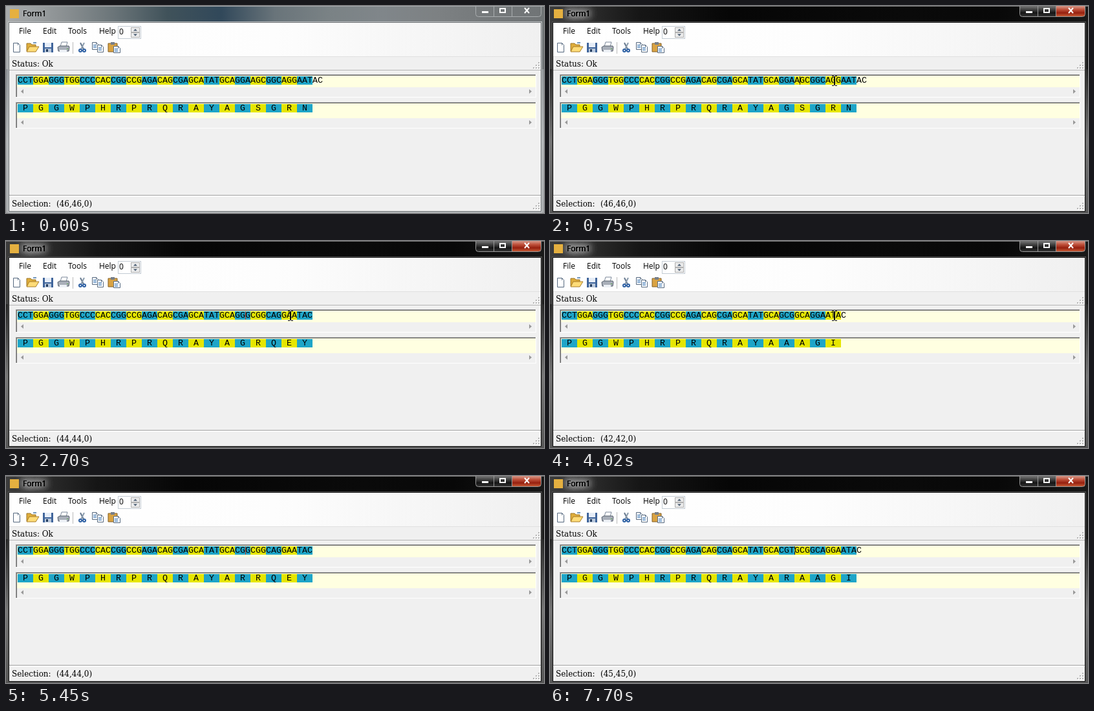
Animation, 832 px wide and 321 px high, one loop 8000 ms. Source, as an HTML page with a canvas:

```html
<!DOCTYPE html>
<html>
<head>
<meta charset="utf-8">
<style>
html, body { margin: 0; width: 100%; height: 100%; overflow: hidden; background: #000 }
canvas { display: block }
</style>
</head>
<body>
<canvas id="stage" width="832" height="321"></canvas>
<script>
const ctx = document.getElementById('stage').getContext('2d');
const LOOP = 8000, CELL = 8, LEFT = 18;
const UI = '12px "Open Sans", sans-serif';
const SERIF = '12px "DejaVu Serif", serif';
const MONO = '13.3px "Liberation Mono", monospace';
const BLUE = '#1ea5c8', YELLOW = '#e6e600', PAPER = '#ffffe1', FACE = '#f0f0f0';

// Editing: each key removes the base before the caret or inserts one there.
const START = 'CCTGGAGGGTGGCCCCACCGGCCGAGACAGCGAGCATATGCAGGAAGCGGCAGGAATAC';
const KEYS = [[2220, ''], [2700, ''], [3030, ''], [3490, ''], [4520, 'C'], [5450, 'G'], [6140, 'T']];
const BLINKS = [1310, 1840, 4020, 5070, 5910, 6620, 7150, 7700];
const ACTIVATED = 750, MOUSE_HIDDEN = 4520;
const AMINO = 'FFLLSSSSYY**CC*WLLLLPPPPHHQQRRRRIIIMTTTTNNKKSSRRVVVVAAAADDEEGGGG';
const translate = codon => AMINO[[...codon].reduce((n, base) => n * 4 + 'TCAG'.indexOf(base), 0)];

function editorAt(t) {
  let text = START, caret = 46, since = ACTIVATED;
  for (const [time, base] of KEYS) {
    if (t < time) break;
    text = text.slice(0, base ? caret : caret - 1) + base + text.slice(caret);
    caret += base ? 1 : -1;
    since = time;
  }
  const blinks = BLINKS.filter(b => b > since && b <= t).length;
  return { text, caret, lit: blinks % 2 === 0 };
}

function rect(x, y, w, h, color) {
  ctx.fillStyle = color;
  ctx.fillRect(x, y, w, h);
}
function frame(x, y, w, h, color) {
  ctx.strokeStyle = color;
  ctx.lineWidth = 1;
  ctx.strokeRect(x + .5, y + .5, w - 1, h - 1);
}
function label(str, x, y, font, color = '#000') {
  ctx.font = font;
  ctx.fillStyle = color;
  ctx.fillText(str, x, y);
}
function poly(points, fill, stroke, width = 1) {
  ctx.beginPath();
  points.forEach(([x, y]) => ctx.lineTo(x, y));
  ctx.closePath();
  if (fill) { ctx.fillStyle = fill; ctx.fill(); }
  if (stroke) { ctx.strokeStyle = stroke; ctx.lineWidth = width; ctx.stroke(); }
}
function line(x1, y1, x2, y2, color, width = 1) {
  poly([[x1, y1], [x2, y2]], null, color, width);
}
function gradient(x1, y1, x2, y2, ...colors) {
  const g = ctx.createLinearGradient(x1, y1, x2, y2);
  colors.forEach((c, i) => g.addColorStop(i / (colors.length - 1), c));
  return g;
}

function drawGlass(active) {
  rect(0, 0, 832, 321, active
    ? gradient(0, 0, 832, 0, '#3c3c3c', '#161616', '#060606', '#080808', '#0a0a0a', '#080808', '#181818')
    : gradient(0, 0, 832, 0, '#a8abad', '#8d9294', '#6b7579', '#40525a', '#31485a', '#69747a',
      '#7a8285', '#80868a', '#7d8183', '#74787a', '#707476'));
  rect(0, 0, 832, 1, active ? '#777' : '#a5a9ac');
  const side = active
    ? gradient(0, 98, 0, 321, '#222', '#777', '#555')
    : gradient(0, 98, 0, 321, '#8d9194', '#b0b3b5', '#a5a8aa');
  rect(0, 98, 832, 223, side);

  ctx.save();
  ctx.shadowColor = active ? '#fff' : '#ccc';
  ctx.shadowBlur = 12;
  for (let i = 0; i < (active ? 4 : 1); i++) label('Form1', 26, 16, UI);
  ctx.restore();
  label('Form1', 26, 16, UI);
  rect(6, 5, 14, 14, '#e5b040');
  drawCaptionButtons(active);
}

function drawCaptionButtons(active) {
  if (active) {
    rect(727, 0, 60, 16, gradient(0, 0, 0, 16, '#777', '#444', '#151515', '#333'));
    rect(783, 0, 44, 16, gradient(0, 0, 0, 16, '#d79a8c', '#c0523c', '#96200f', '#c65a35'));
  }
  const edge = active ? '#999' : '#a9adaf';
  ctx.beginPath();
  ctx.roundRect(726.5, -4.5, 101, 21, 4);
  ctx.strokeStyle = edge;
  ctx.lineWidth = 1;
  ctx.stroke();
  rect(754, 0, 1, 16, edge);
  rect(782, 0, 1, 16, edge);
  rect(736, 8, 10, 3, '#fff');
  ctx.strokeStyle = '#fff';
  ctx.lineWidth = 2;
  ctx.strokeRect(764, 4, 8, 6);
  line(802, 3, 809, 11, '#fff', 2);
  line(809, 3, 802, 11, '#fff', 2);
}

function page(x, y, w = 10, h = 13) {
  poly([[x, y], [x + w - 3, y], [x + w, y + 3], [x + w, y + h], [x, y + h]], '#fff', '#56697f');
  line(x + w - 3, y, x + w - 3, y + 3, '#56697f');
}
function textLines(x, y) {
  for (let i = 0; i < 3; i++) rect(x, y + i * 2, 5, 1, '#4b83bd');
}

function drawToolbar() {
  page(11.5, 57.5, 10, 14);

  poly([[32, 70], [32, 58], [38, 58], [40, 60], [46, 60], [46, 70]], '#dfad3b', '#9a7426');
  poly([[32, 71], [36, 63], [51, 63], [46, 71]], '#ffdc78', '#a87d28');
  line(42, 57, 47, 57, '#4676aa');

  rect(57, 57, 16, 15, '#40659b');
  rect(60, 57, 10, 7, '#e6edf7');
  rect(60, 66, 10, 6, '#bac9dc');
  rect(62, 67, 3, 4, '#263e60');

  poly([[84, 63], [86, 56], [95, 56], [93, 63]], '#fff', '#7a8799');
  poly([[80, 64], [83, 62], [97, 62], [98, 64], [97, 70], [81, 70]], '#a9afb9', '#535c69');
  rect(83, 68, 11, 4, '#edf1f6');
  rect(94, 66, 2, 1, '#4fa43f');
  rect(103, 56, 1, 18, '#bbb');

  line(115, 57, 120, 67, '#65788d', 2);
  line(121, 57, 116, 67, '#8b9cad', 2);
  ctx.strokeStyle = '#2c5fa3';
  ctx.lineWidth = 2;
  for (const x of [115, 121]) {
    ctx.beginPath();
    ctx.arc(x, 69, 2, 0, 7);
    ctx.stroke();
  }

  page(133.5, 56.5, 9, 11);
  textLines(135, 60);
  page(141.5, 60.5, 9, 11);
  textLines(143, 64);

  poly([[158, 58], [172, 58], [172, 71], [158, 71]], '#d9a343', '#815e27');
  rect(162, 56, 6, 4, '#777f89');
  page(166.5, 62.5, 10, 10);
  textLines(168, 66);
}

function drawSpinner() {
  rect(173, 31, 36, 20, '#fff');
  frame(173, 31, 36, 20, '#c3cbd3');
  label('0', 175, 44, UI);
  for (const [y, dir] of [[33, -1], [41, 1]]) {
    rect(193, y, 14, 8, '#ececec');
    frame(193, y, 14, 8, '#b0b0b0');
    poly([[197, y + 4 - dir * 1.5], [203, y + 4 - dir * 1.5], [200, y + 4 + dir * 1.5]], '#42566d');
  }
}

function drawGrip(bottom) {
  for (let row = 0; row < 3; row++)
    for (let col = 0; col <= row; col++) {
      const x = 823 - col * 4, y = bottom - 10 + row * 4;
      rect(x + 1, y + 1, 2, 2, '#fff');
      rect(x, y, 2, 2, '#b4b4b4');
    }
}

function drawBox(y, h) {
  rect(15, y, 805, h, '#fff');
  rect(15, y, 804, h - 1, '#a0a0a0');
  rect(16, y + 1, 803, h - 2, '#696969');
  rect(17, y + 2, 802, h - 3, FACE);
  rect(17, y + 2, 802, h - 18, PAPER);
  const mid = y + h - 9.5;
  poly([[23, mid], [27, mid - 3.5], [27, mid + 3.5]], '#999');
  poly([[813, mid], [809, mid - 3.5], [809, mid + 3.5]], '#999');
}

function drawForm(active) {
  frame(3, 24, 826, 296, active ? '#555' : '#c4c7c9');
  rect(4, 25, 824, 294, active ? '#111' : '#666a6d');
  rect(5, 26, 822, 292, FACE);
  rect(5, 26, 822, 52, gradient(5, 0, 827, 0, '#fff', '#fdfdfd', FACE));
  [['File', 20], ['Edit', 57], ['Tools', 96], ['Help', 144]].forEach(([s, x]) => label(s, x, 43, UI));
  drawSpinner();
  drawToolbar();
  rect(5, 78, 822, 1, '#e0e0e0');
  label('Status: Ok', 9, 94, SERIF);
  rect(5, 99, 822, 1, '#b5b5b5');
  rect(5, 293, 822, 1, '#a0a0a0');
  rect(5, 294, 822, 2, '#fff');
  drawGrip(97);
  drawGrip(315);
  drawBox(106, 36);
  drawBox(149, 41);
}

function drawSequence(text) {
  text.match(/.{1,3}/g).forEach((codon, i) => {
    const x = LEFT + i * 3 * CELL, full = codon.length === 3;
    if (full) {
      const color = i % 2 ? YELLOW : BLUE;
      rect(x, 109, 3 * CELL, 13, color);
      rect(x, 152, 3 * CELL, 13, color);
      label(translate(codon), x + CELL, 162, MONO);
    }
    [...codon].forEach((base, k) => label(base, x + k * CELL, 119, MONO));
  });
}

function drawCaret({ text, caret, lit }) {
  const codon = Math.floor(caret / 3), x = LEFT + caret * CELL;
  const onBlue = codon % 2 === 0 && codon * 3 + 3 <= text.length;
  const color = onBlue ? '#b8402c' : '#202020';
  rect(x, 109, 1, 4, color);
  rect(x, 117, 1, 5, color);
  if (lit) rect(x, 113, 1, 4, color);
}

function drawIBeam(x, y) {
  const strokes = [[-4, -8, 3, 1], [1, -8, 3, 1], [-1, -7, 2, 14], [-4, 7, 3, 1], [1, 7, 3, 1]];
  for (const [dx, dy, w, h] of strokes) rect(x + dx - .5, y + dy, w + 1, h, 'rgba(255,255,255,.55)');
  for (const [dx, dy, w, h] of strokes) rect(x + dx, y + dy, w, h, '#000');
}
function drawArrow(x, y) {
  const shape = [[0, 0], [0, 16], [4, 12.5], [7, 18.5], [9, 17.5], [6.5, 11.5], [11.5, 11.5]];
  poly(shape.map(([dx, dy]) => [x + dx, y + dy]), '#fff', '#000');
}

function drawMouse(t) {
  if (t < 70 || t >= MOUSE_HIDDEN) return;
  if (t >= 700) return drawIBeam(440, 116);
  const left = 1 - Math.min(6, Math.floor((t - 70) / 76.6)) / 6;
  const x = Math.round(440 + 252 * left ** 1.5), y = Math.round(123 + 182 * left ** 1.5);
  const overText = x < 819 && (y < 141 || (y > 149 && y < 174));
  (overText ? drawIBeam : drawArrow)(x, y);
}

function draw(t) {
  const active = t >= ACTIVATED, editor = editorAt(t);
  drawGlass(active);
  drawForm(active);
  drawSequence(editor.text);
  if (active) drawCaret(editor);
  label('Selection:', 9, 311, SERIF);
  label(`(${editor.caret},${editor.caret},0)`, 78, 311, SERIF);
  drawMouse(t);
}

const began = performance.now();
function tick() {
  draw((performance.now() - began) % LOOP);
  requestAnimationFrame(tick);
}
tick();
</script>
</body>
</html>
```
